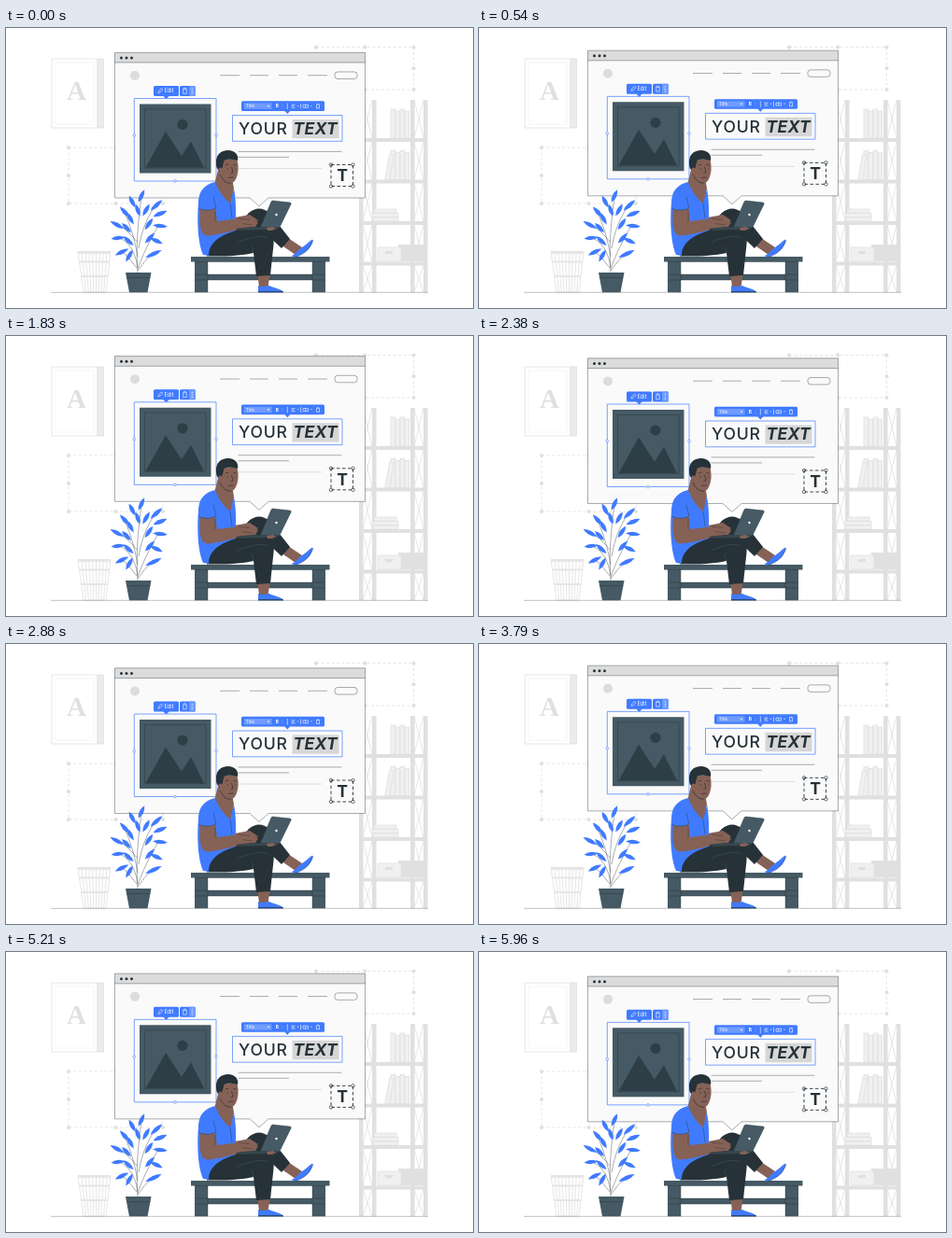
Animation of 500x300 px, one loop 6000 ms. Source, as an HTML page:

```html
<!DOCTYPE html>
<html lang="en">
<head>
<meta charset="utf-8">
<title>Page builder</title>
<style>
  html, body { margin: 0; width: 100%; height: 100%; overflow: hidden; background: #fff; }
  svg { display: block; width: 500px; height: 300px; }
  text { font-family: Inter, "Open Sans", sans-serif; }
  .line { fill: none; stroke: #263238; stroke-width: .4; }
  .soft { fill: none; stroke: #e0e0e0; stroke-width: .8; }
  .icon { fill: none; stroke: #fff; stroke-width: .6; }
  .skin { fill: #866156; }
  .blue { fill: #407bff; }
  .dark { fill: #263238; }
  .slate { fill: #455a64; }
</style>
</head>
<body>
<svg viewBox="0 0 500 300">
  <!-- Wall -->
  <g class="soft">
    <path d="M49 33H98V107H49Z"/>
    <path d="M98 33H104.500V107H98Z" fill="#ebebeb"/>
    <path d="M53 37H94V103H53Z" stroke="#f3f3f3"/>
  </g>
  <text x="75.500" y="77" text-anchor="middle" font-size="29" font-weight="700" fill="#e0e0e0"
    style="font-family:'Liberation Serif',serif">A</text>
  <g id="wallBoxes" class="soft"></g>

  <g id="shelf" fill="#e0e0e0"></g>

  <!-- Basket -->
  <path class="soft" d="M77 239.500H112L107 283H83Z"/>
  <g id="slats" class="soft"></g>
  <path d="M77 239.500H112L111.700 242H77.300ZM78.500 249.500H111L110.800 251.500H78.700ZM80.500 265H109.200L109 267H80.800Z" fill="#e6e6e6"/>
  <path d="M48 283.300H452" stroke="#263238" stroke-width=".3"/>

  <!-- Browser window -->
  <g id="page">
    <path d="M116.500 26.300H384.500V182H281L271 191L261 182H116.500Z" fill="#fafafa"/>
    <path d="M116.500 26.300H384.500V37H116.500Z" fill="#dcdcdc"/>
    <path class="line" d="M116.500 26.300H384.500V182H281L271 191L261 182H116.500ZM116.500 37H384.500"/>
    <g class="dark"><circle cx="123.500" cy="32" r="1.500"/><circle cx="129" cy="32" r="1.500"/><circle cx="134.500" cy="32" r="1.500"/></g>
    <circle cx="138" cy="51" r="5" fill="#dcdcdc"/>
    <path class="line" d="M229 50.700H250M261 50.700H281M292 50.700H312M323 50.700H344"/>
    <rect class="line" x="352" y="47" width="24" height="7.500" rx="3"/>

    <!-- Picture block -->
    <path class="slate" d="M143 81.500H219.500V155.500H143Z"/>
    <path class="line" d="M148.500 87H214V150H148.500Z"/>
    <path d="M149.500 149.500L171 111L188 137L198 121.500L212 149.500Z" fill="#2e3e46"/>
    <circle cx="189" cy="103.500" r="5.600" fill="#2e3e46"/>
    <path d="M137.300 75.500H225V164H137.300Z" fill="none" stroke="#407bff" stroke-width=".7"/>
    <g id="handles" fill="#fff"></g>
    <g class="blue">
      <rect x="158" y="62" width="27" height="11" rx="1.500"/>
      <path d="M168 72.500H175L171.500 76Z"/>
      <rect x="186" y="62" width="17" height="11" rx="1.500"/>
    </g>
    <rect x="196" y="62" width="7" height="11" rx="1.500" fill="#709cff"/>
    <text x="169.500" y="69.500" font-size="5.600" fill="#fff">Edit</text>
    <path class="icon" d="M163 69.500L163.500 67.500L166.500 64.500L168 66L165 69ZM189 65.500H194M190.500 65V64.300H192.500V65M189.700 66V70.300H193.300V66"/>
    <g fill="#fff"><circle cx="199.300" cy="65" r=".6"/><circle cx="199.300" cy="67.500" r=".6"/><circle cx="199.300" cy="70" r=".6"/></g>

    <!-- Text block -->
    <path d="M242.500 93.500H360V121.300H242.500Z" fill="none" stroke="#407bff" stroke-width=".7"/>
    <path d="M306.500 98H356.500V118.300H306.500Z" fill="#d6d6d6"/>
    <g class="dark" font-size="17.600">
      <text x="249" y="113.800" font-weight="500" letter-spacing=".8">YOUR</text>
      <text x="307.500" y="113.800" font-weight="700" font-style="italic" letter-spacing=".2">TEXT</text>
    </g>
    <rect class="blue" x="252" y="78.300" width="89" height="10.700" rx="1.500"/>
    <path class="blue" d="M298 88.500H304.500L301.300 92Z"/>
    <rect x="255" y="80.500" width="29.500" height="6.300" fill="#709cff"/>
    <g fill="#fff">
      <text x="257" y="85.300" font-size="4.500">Title</text>
      <text x="288.700" y="85.300" font-size="4.800" font-weight="700">B</text>
      <path d="M279.700 83H282.300L281 84.700ZM311.700 83H313.300L312.500 84.300ZM326.200 83H327.800L327 84.300Z"/>
      <circle cx="296" cy="82.600" r=".4"/><circle cx="296" cy="84.800" r=".4"/>
    </g>
    <path class="icon" d="M301.300 80.500V87M305.500 82.300H309.500M305.500 83.800H308.500M305.500 85.300H309.500M318 82.300H323.500V85.300H318ZM320.700 82.300V85.300M315.500 81V86.500M332 82H336M333.300 81.400H334.700M332.500 82.500V86H335.500V82.500"/>

    <path class="line" d="M248.500 132.400H359.500M248.500 138.400H303"/>
    <path class="line" d="M249 150.500H338" stroke-opacity=".35"/>
    <path class="line" d="M348 146.500H371.500V169.500H348Z" stroke-dasharray="3.500 2.500" style="stroke-width:.9"/>
    <text class="dark" x="360" y="164.300" text-anchor="middle" font-size="17.600" font-weight="700">T</text>
  </g>

  <!-- Plant -->
  <g id="plant"></g>
  <path class="slate" d="M128 262H155.500L151.500 283.300H132Z"/>
  <path class="line" d="M129 267.500H154.500"/>

  <!-- Bench -->
  <path class="slate" d="M202 249H216V283.300H202ZM328 249H342V283.300H328ZM198 245H346.500V250.500H198ZM202 264H342V270H202Z"/>
  <path class="line" d="M202 250.500H342M202 264H342M202 270H342M216 250.500V283M328 250.500V283"/>

  <!-- Seated man -->
  <g>
    <!-- Feet -->
    <path class="skin" d="M269 260H283L280.500 278H271Z"/>
    <path class="blue" d="M270 276C275 278 279 276 282 276C287 279 295 279 297 283.300H270Z"/>
    <path class="dark" d="M270 282.300H297V283.300H270Z"/>
    <path class="skin" d="M294 232L302 225L317 235L310 243Z"/>
    <path class="blue" d="M306 244C311 242 313 237 317 235C322 232 325 228 328 226.500C329.500 228 327 233 324 237C319 242 312 245 308 246Z"/>
    <path class="line" d="M308 246C317 244 325 238 329 227"/>

    <!-- Legs -->
    <path class="dark" d="M224 238L260 198Q271 189 282 198L304 226L295 236L276 218Z"/>
    <path class="dark" d="M215 244.500C214 231 224 221 240 218L268 214C283 213 288 221 286.500 232L283 265L268 266L265 241C250 244 235 245 215 244.500Z"/>
    <path d="M248 230C260 225 272 221 281 225M265 241L263 234" fill="none" stroke="#455a64" stroke-width=".5"/>

    <!-- Torso and arm -->
    <path class="skin" d="M227 152L242 160L244 172L241 190L222 172Z"/>
    <path class="blue" d="M224 165C214 167 208 173 206.500 182C204.500 200 204.500 228 211 243L217 244C217 232 226 223 246 217C246 206 247 187 244 172L240 188C233 182 227 174 224 165Z"/>
    <path class="skin" d="M208 190C207 203 207 214 210 219C212 223 216 223 220 222C230 221 244 217 254 214L267 213L270 208L262 205.500L250 204L226 207L224 190Z"/>
    <path class="blue" d="M211 173C206 180 206 188 206 193C212 196 219 196 225 193L222 179Z"/>
    <path class="line" d="M206 193C212 196 219 196 225 193L222 181M240 188L242 204M224 207V196"/>

    <!-- Head -->
    <path class="skin" d="M229 142L247 140C249.500 147 249 156 246 162C243 168 237 168 233 163L228 157Z"/>
    <path class="dark" d="M225 146C224 136 230 131 238 131C245 131 249.500 136 248 142C243 140.500 238 140 233.500 142L231.500 150L229 153C226 152 225 149 225 146Z"/>
    <ellipse class="skin" cx="229.500" cy="152.500" rx="2.200" ry="2.900"/>
    <path class="line" d="M235 147L238.500 146M243.500 146.500L246.500 147M241.500 149L243 155L240.500 155.500M238 160.500L243.500 160M236.500 151H238M245 151H246M229 157C232 163 236 167 241 166" style="stroke-width:.7"/>

    <!-- Laptop and hands -->
    <path class="slate" d="M272 214L284 186Q284.500 185 286 185L304.500 187Q306 187.300 305.300 189L294 212Q293 214 291 214Z"/>
    <path d="M246 214.500L272 213H291L290 215.700L250 216.700Z" fill="#37474f"/>
    <path class="line" d="M272 214L284 186Q284.500 185 286 185L304.500 187"/>
    <circle cx="289.500" cy="200" r="1.200" fill="#fff"/>
    <path class="skin" d="M245 203L261 200L270 206L264 211L250 210ZM279 214L286 213L289 215L285 217H280Z"/>
    <path class="line" d="M249 204L261 205.500M253 209.500L264 211"/>
  </g>
</svg>
<script>
  const el = id => document.getElementById(id);
  const rect = (x, y, w, h, extra = "") => `<rect x="${x}" y="${y}" width="${w}" height="${h}" ${extra}/>`;
  const dot = (x, y, r) => `<circle cx="${x}" cy="${y}" r="${r}"/>`;

  // Dashed frame with a handle at each corner and side middle.
  function dashedBox(x, y, w, h) {
    let out = rect(x, y, w, h, 'stroke-dasharray="3 2.5"');
    for (const i of [0, .5, 1]) for (const j of [0, .5, 1])
      if (i !== .5 || j !== .5) out += `<g fill="#e0e0e0">${dot(x + w * i, y + h * j, 1.7)}</g>`;
    return out;
  }
  el("wallBoxes").innerHTML = dashedBox(67, 128, 101, 60) + dashedBox(332, 20.500, 104.500, 45.500);

  const pictureDots = [[137.300, 115], [225, 115], [181, 164]].map(([x, y]) => dot(x, y, 1.300)).join("");
  const letterDots = [348, 371.500].map(x => dot(x, 146.500, 1.700) + dot(x, 169.500, 1.700)).join("");
  el("handles").innerHTML = `<g stroke="#407bff" stroke-width=".6">${pictureDots}</g><g stroke="#263238" stroke-width=".7">${letterDots}</g>`;

  const levels = [77, 118, 162.500, 207, 250.500];
  const posts = [378, 392, 433, 447].map(x => rect(x, 77, 4.500, 206.300)).join("");
  const boards = levels.slice(1).map(y => rect(379, y, 72, 4)).join("");
  const braces = levels.map((y, i) => [382, 437].map(x => {
    const top = y + (i ? 4 : 0), bottom = levels[i + 1] ?? 283;
    return `M${x} ${top}L${x + 10} ${bottom}M${x + 10} ${top}L${x} ${bottom}`;
  }).join("")).join("");
  const outline = 'fill="#f0f0f0" stroke="#e0e0e0" stroke-width=".8"';
  const bookRow = (x, y, n) => Array.from({ length: n }, (_, i) =>
    rect(x + i * 5, y - 31 + i % 2 * 2, 4.600, 31 - i % 2 * 2, outline)).join("");
  const books = bookRow(412, 118, 4) + bookRow(412, 162.500, 4) + rect(406, 135, 4.600, 28, outline + ' transform="rotate(10 408 162)"');
  const stack = rect(394, 194, 24, 4, outline) + rect(392, 198.500, 28, 4, outline) + rect(393, 203, 27, 4, outline);
  const boxes = rect(420, 232, 27, 18) + rect(398, 235, 25, 15, outline) + rect(406, 239, 8, 3);
  el("shelf").innerHTML = posts + `<path class="soft" d="${braces}"/>` + books + stack + boxes + boards;

  let slats = "";
  for (let i = 1; i < 9; i++) slats += `<path d="M${77 + i * 3.900} 240L${83 + i * 2.700} 283"/>`;
  el("slats").innerHTML = slats;

  // Leaves: centre x, centre y, angle, length.
  const leaves = [
    [145, 180, -65, 15], [135, 186, 62, 14], [127, 197, 48, 15], [133, 204, 60, 15],
    [119, 211, 28, 17], [129, 214, 45, 14], [120, 225, -5, 15], [131, 228, 42, 15],
    [124, 240, -25, 16], [132, 244, -60, 15], [150, 195, -60, 15], [161, 190, -42, 17],
    [165, 199, -22, 16], [153, 210, -55, 15], [165, 212, 5, 16], [154, 225, -48, 15],
    [161, 228, 25, 15], [158, 242, -25, 19], [141, 195, 70, 14]
  ];
  const leaf = ([x, y, a, n]) =>
    `<path class="blue" transform="translate(${x} ${y}) rotate(${a})" d="M${-n / 2} 0Q0 -4.600 ${n / 2} 0Q0 4.600 ${-n / 2} 0Z"/>`;
  el("plant").innerHTML = `<path class="line" d="M141 263C139 236 141 210 145 181M141 256C138 238 130 228 121 225M141 245C137 222 131 206 126 196M141 258C146 244 153 229 163 212M142 236C145 218 151 203 160 190M140 257Q132 246 124 239M141 260Q149 248 157 242M140 229Q130 216 120 211"/>`
    + leaves.map(leaf).join("");

  const page = el("page"), period = 3000, lift = 6;
  function draw() {
    const phase = performance.now() % period / period;
    page.setAttribute("transform", `translate(0 ${-lift * (1 - Math.abs(1 - 2 * phase))})`);
    requestAnimationFrame(draw);
  }
  draw();
</script>
</body>
</html>
```
